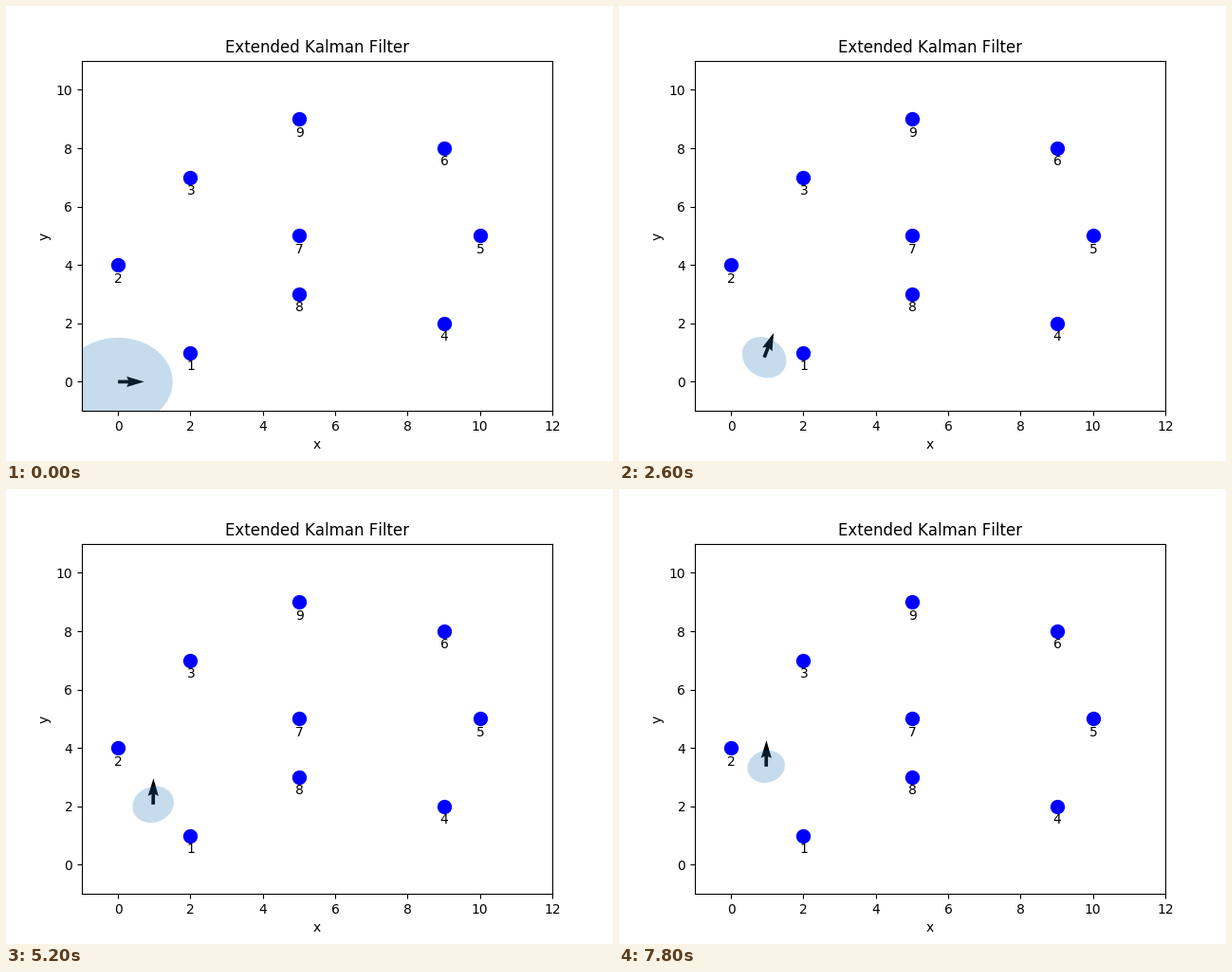
These frames come from a looping animation (640x480 px, 8000 ms). A matplotlib script:

```python
import numpy as np
import matplotlib.pyplot as plt
from matplotlib.animation import FuncAnimation
from matplotlib.patches import Ellipse

FRAMES, INTERVAL = 40, 200
STEP = 0.1            # distance driven per step
SENSOR_RANGE = 5.04
CHI2 = 2.2789         # 68 % region in two dimensions

LANDMARKS = np.array([(2, 1), (0, 4), (2, 7), (9, 2), (10, 5),
                      (9, 8), (5, 5), (5, 3), (5, 9)], float)


def pose(k):
    """Left turn that eases into a straight drive upwards."""
    x = 0.97 * np.sin(np.pi / 2 * min(k / 16.5, 1))
    y = 0.101 * k - 0.58 * (1 - np.exp(-k / 7.5))
    return np.array([x, y]), min(0.0925 * k, 1.56)


def run_filter():
    """Poses and position covariances for every step."""
    sigma = np.eye(3)
    motion_noise = np.diag([0.2, 0.2, 0.02])
    states = []
    for k in range(FRAMES):
        xy, theta = pose(k)
        if k:
            G = np.eye(3)
            G[0, 2] = -STEP * np.sin(theta)
            G[1, 2] = STEP * np.cos(theta)
            sigma = G @ sigma @ G.T + motion_noise
            diff = xy - LANDMARKS
            dist = np.hypot(*diff.T)
            seen = dist < SENSOR_RANGE
            H = np.zeros((seen.sum(), 3))
            H[:, :2] = diff[seen] / dist[seen, None]
            S = H @ sigma @ H.T + 0.5 * np.eye(len(H))
            K = sigma @ H.T @ np.linalg.inv(S)
            sigma = (np.eye(3) - K @ H) @ sigma
        states.append((xy, theta, sigma[:2, :2]))
    return states


states = run_filter()

plt.rcParams["text.kerning_factor"] = 6
fig, ax = plt.subplots(figsize=(6.4, 4.8), dpi=100)
ax.set(xlim=(-1, 12), ylim=(-1, 11), xlabel="x", ylabel="y",
       title="Extended Kalman Filter")
ax.plot(*LANDMARKS.T, "o", color="#0000ff", markersize=10)
for n, point in enumerate(LANDMARKS, 1):
    ax.annotate(str(n), point, xytext=(0.5, -18.5),
                textcoords="offset pixels", ha="center", va="baseline")

arrow = ax.quiver(0, 0, 1, 0, color="black", zorder=1)
region = ax.add_patch(Ellipse((0, 0), 1, 1, color="C0", alpha=0.25, lw=0,
                              zorder=1.1))


def draw(k):
    xy, theta, cov = states[k]
    vals, vecs = np.linalg.eigh(cov)
    region.set_center(xy)
    region.set_width(2 * np.sqrt(CHI2 * vals[1]))
    region.set_height(2 * np.sqrt(CHI2 * vals[0]))
    region.set_angle(np.degrees(np.arctan2(vecs[1, 1], vecs[0, 1])))
    arrow.set_offsets([xy])
    arrow.set_UVC(np.cos(theta), np.sin(theta))
    return arrow, region


anim = FuncAnimation(fig, draw, frames=FRAMES, interval=INTERVAL,
                     repeat=True, repeat_delay=0)
plt.show()
```
